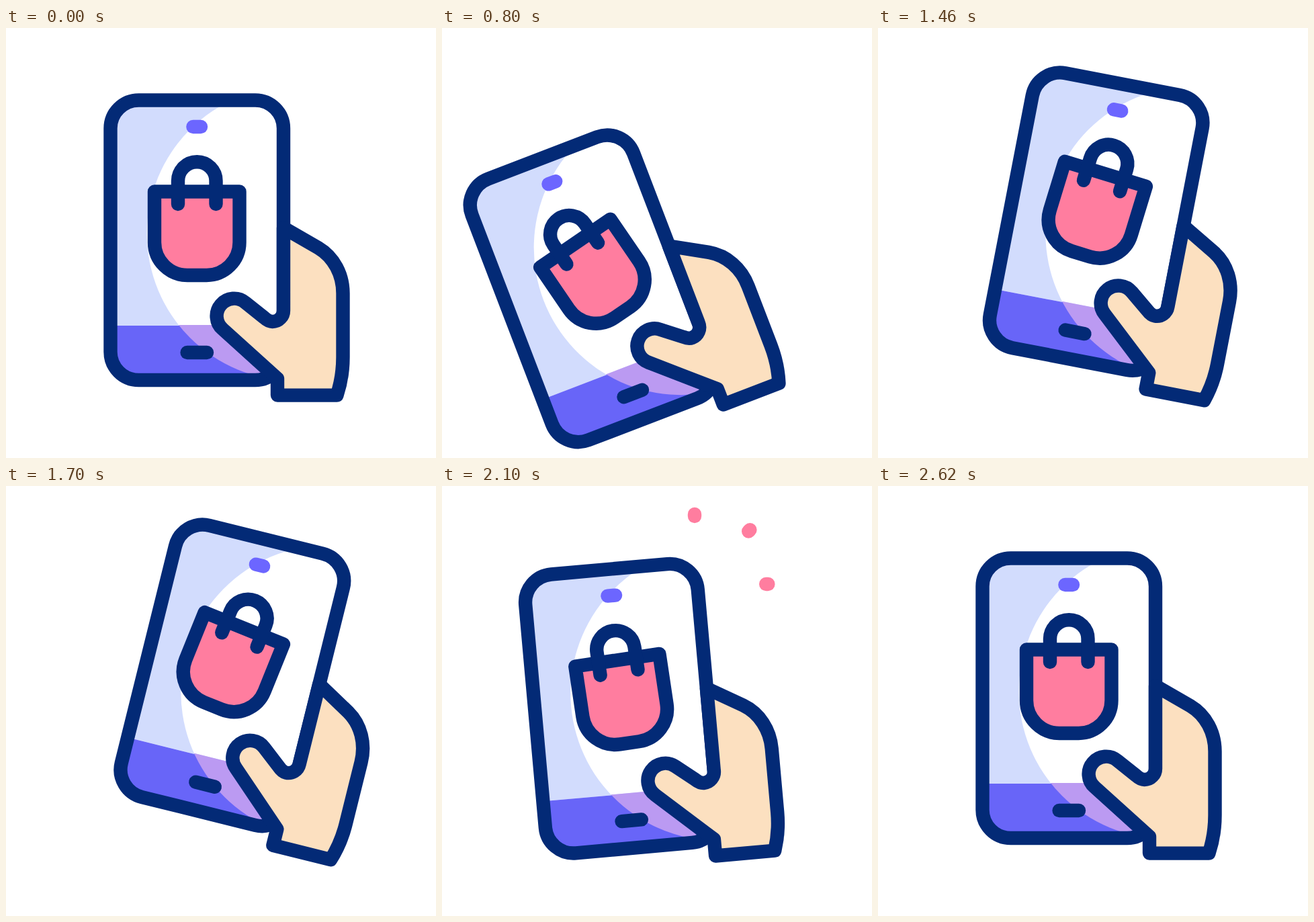
An HTML page that plays this animation: 640x640 px, repeating every 2820 ms.

```html
<!DOCTYPE html>
<html lang="en">
<head>
<meta charset="utf-8">
<title>Mobile shopping</title>
<style>
  html, body { margin: 0; width: 100%; height: 100%; overflow: hidden; background: #fff; }
  svg { display: block; width: 100vw; height: 100vh; }
  .line, #sparks { fill: none; stroke: #032a76; stroke-width: 20.4; stroke-linecap: round; stroke-linejoin: round; }
  #sparks { stroke: #ff7d9f; stroke-dasharray: 1 9; }
</style>
</head>
<body>
<svg viewBox="0 0 640 640">
  <defs>
    <rect id="body" x="155.5" y="107.5" width="257.5" height="416.5" rx="42"/>
    <clipPath id="screen"><use href="#body"/></clipPath>
    <clipPath id="glow"><circle cx="428.9" cy="306" r="219.2"/></clipPath>
  </defs>
  <g id="sparks">
    <path pathLength="1" d="M376 45V30"/>
    <path pathLength="1" d="M456.2 67.5L467 56.7"/>
    <path pathLength="1" d="M482.2 146H497.8"/>
  </g>
  <g id="device">
    <g clip-path="url(#screen)">
      <path fill="#d2dcfd" d="M150 100H420V443H150Z"/>
      <path fill="#6865f8" d="M150 443H420V530H150Z"/>
      <g clip-path="url(#glow)">
        <path fill="#fff" d="M150 100H420V442H150Z"/>
        <path fill="#bb9af2" d="M150 442H420V530H150Z"/>
      </g>
    </g>
    <use class="line" href="#body"/>
    <path class="line" style="stroke:#6c66ff" d="M278.4 147H290"/>
    <path class="line" d="M269.6 483H299"/>
    <g id="bag">
      <path class="line" style="fill:#ff7d9f" d="M221 243.5H347.5V319A49 49 0 0 1 298.5 368H270A49 49 0 0 1 221 319Z"/>
      <path class="line" d="M256 262V227.5A28.2 28.2 0 0 1 312.5 227.5V262"/>
    </g>
    <path class="line" style="fill:#fce0c0" d="M413 297.3L465 327.3C488 341 501.5 367 501.5 395V490C501.5 510 498 530 492.5 546.6H404V521.8L322.6 448.3A26 26 0 0 1 356.3 408.7L384.5 431.3C388 434.5 392 437 396.5 437A16.5 16.5 0 0 0 413 420Z"/>
  </g>
</svg>
<script>
  const LOOP = 2820;
  const part = id => document.getElementById(id);
  const device = part('device'), bag = part('bag'), sparks = part('sparks');

  // turning points of the swing; angles in degrees
  const turns = [
    { at: 220, tilt: 0, sway: 0 },
    { at: 564, tilt: -20.5, sway: -12.2 },
    { at: 987, tilt: -21.3, sway: -14.2 },
    { at: 1620, tilt: 16.5, sway: 9.6 },
    { at: 2002, tilt: -7.3, sway: -4.9 },
    { at: 2331, tilt: 3.3, sway: 2.5 },
    { at: 2620, tilt: 0, sway: 0 }
  ];

  const ramp = (t, from, to) => Math.min(1, Math.max(0, (t - from) / (to - from)));
  const ease = u => (1 - Math.cos(Math.PI * u)) / 2;

  // each turn adds its eased step to the sum
  const swing = (t, key) => turns.slice(1).reduce((sum, turn, i) => {
    const last = turns[i];
    return sum + (turn[key] - last[key]) * ease(ramp(t, last.at, turn.at));
  }, 0);

  const rotate = (el, angle, x, y) => el.setAttribute('transform', `rotate(${angle} ${x} ${y})`);

  function draw(t) {
    rotate(device, swing(t, 'tilt'), 449, 513.6);
    rotate(bag, swing(t, 'sway'), 284, 244);
    // sparks grow outwards, then leave by their outer end
    const grown = ramp(t, 2060, 2260), gone = ramp(t, 2400, 2600);
    sparks.style.strokeDashoffset = 1 - grown - gone;
    sparks.style.visibility = grown > 0 && gone < 1 ? 'visible' : 'hidden';
  }

  const start = performance.now();
  function tick() {
    draw((performance.now() - start) % LOOP);
    requestAnimationFrame(tick);
  }
  tick();
</script>
</body>
</html>
```
